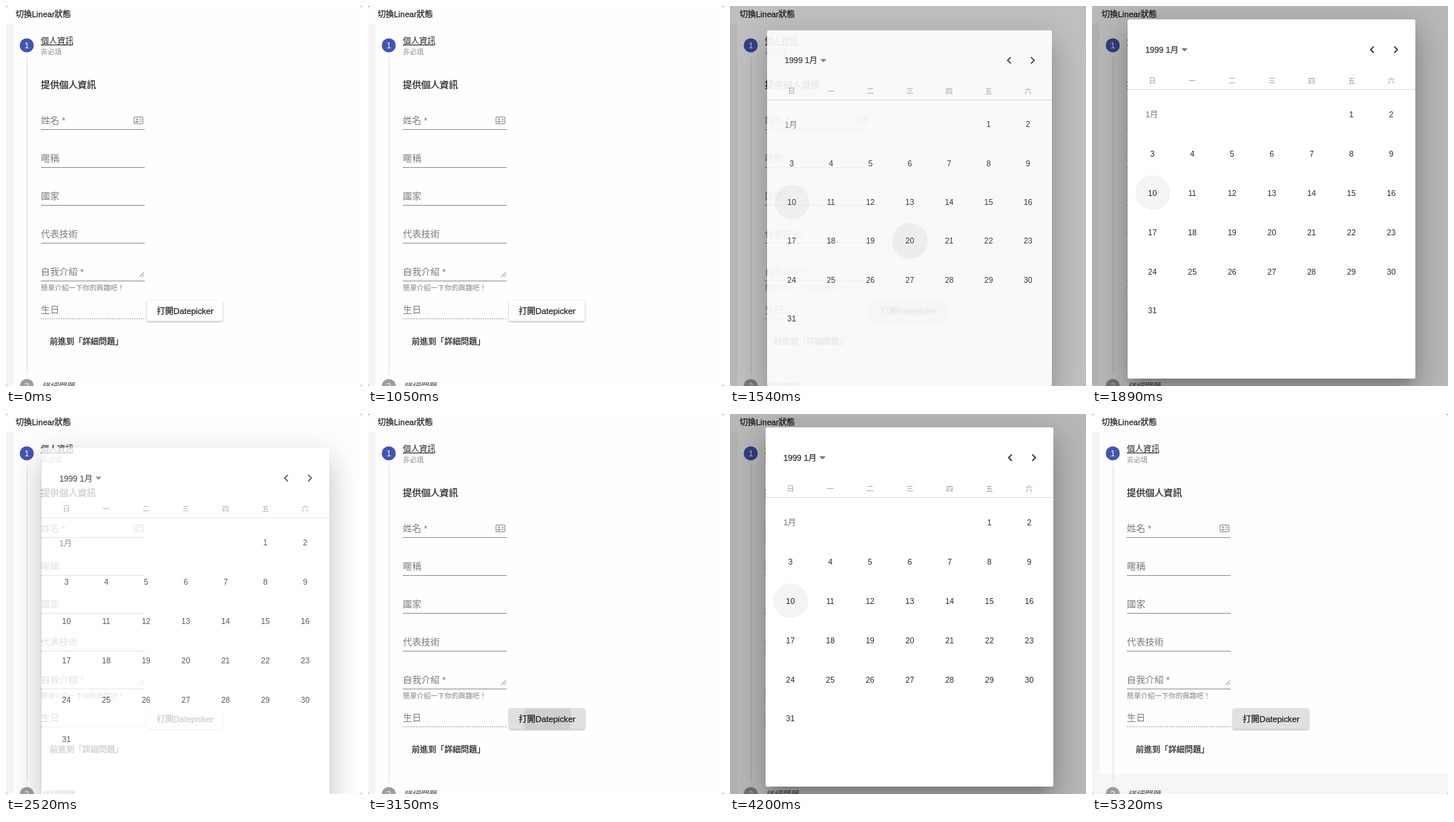
An HTML page for the animation above (5530 ms loop, 480 px wide and 512 px high).

```html
<!DOCTYPE html>
<html lang="zh-Hant">
<head>
<meta charset="utf-8">
<title>Stepper with datepicker dialog</title>
<style>
  html, body { margin: 0; width: 100%; height: 100%; overflow: hidden; background: #aaa; }
  #stage {
    position: relative; width: 480px; height: 512px; overflow: hidden;
    background: #fefefe; border-radius: 4px;
  }
  svg { position: absolute; left: 0; top: 0; display: block; }
  text {
    font-family: "Liberation Sans", "Noto Sans CJK TC", "Noto Sans CJK", sans-serif;
    white-space: pre;
  }
  .medium { font-weight: 500; stroke: currentColor; stroke-width: .25px; }
  #backdrop { position: absolute; inset: 0; background: #000; opacity: 0; }
  #dialog {
    position: absolute; left: 48px; top: 18px; width: 388px; height: 484px;
    background: #fff; border-radius: 2px; opacity: 0;
    box-shadow: 0 11px 15px -7px rgba(0,0,0,.2), 0 24px 38px 3px rgba(0,0,0,.14),
      0 9px 46px 8px rgba(0,0,0,.12);
  }
  #button { filter: drop-shadow(0 1px 1px rgba(0,0,0,.32)); }
</style>
</head>
<body>
<div id="stage">
  <svg id="form" width="480" height="512">
    <defs><clipPath id="buttonClip"><rect x="190" y="396.5" width="102.5" height="28" rx="2"/></clipPath></defs>
    <rect y="24" width="10" height="488" fill="#f5f5f5"/>
    <rect id="band" y="485" width="480" height="27" fill="#f6f6f6"/>
    <path d="M28.5 69V496" stroke="#dedede"/>
    <circle cx="28" cy="53" r="9.5" fill="#4355b3"/>
    <circle cx="28" cy="512" r="9.5" fill="#9e9e9e"/>
    <path d="M47 52.5H90" stroke="#222"/>
    <g fill="none" stroke="#a0a0a0" stroke-width="1.3">
      <rect x="172.6" y="149.6" width="12" height="9" rx="1"/>
      <path d="M180 152.7H183M180 155.3H183"/>
    </g>
    <g fill="#a0a0a0">
      <circle cx="176.6" cy="152.8" r="1.4"/>
      <path d="M174 157Q174 154.8 176.6 154.8T179.2 157Z"/>
    </g>
    <path d="M180 365L186 359M183.5 365L186 362.5" stroke="#777" stroke-width=".9"/>
    <path d="M47 421.5H187" stroke="#999" stroke-dasharray="1.5 1.5"/>
    <rect id="button" x="190" y="396.5" width="102.5" height="28" rx="2" fill="#fff"/>
    <g clip-path="url(#buttonClip)">
      <rect id="focus" x="190" y="396" width="103" height="29"/>
      <circle id="ripple" cx="242" cy="411"/>
    </g>
  </svg>
  <div id="backdrop"></div>
  <div id="dialog">
    <svg id="calendar" width="388" height="484">
      <circle id="active" cx="34" cy="233.5" r="23.5" fill-opacity=".045"/>
      <circle id="hover" cy="286.5" r="24.5" fill-opacity=".05"/>
      <path d="M0 94.5H388" stroke="#e0e0e0"/>
      <path d="M72.5 39H81L76.75 43.3Z" fill="#757575"/>
      <path d="M332 36.5L327.7 40.8L332 45.1M359.5 36.5L363.8 40.8L359.5 45.1"
        fill="none" stroke="#333" stroke-width="1.7"/>
    </svg>
  </div>
</div>
<script>
const LOOP = 5530, STEP = 70, FADE = 400;
// click: ripple start, open/close: dialog start, focus: time the button regains focus
const visits = [
  { click: 1050, open: 1370, close: 2492, focus: [2870, 2940], hover: 194.6 },
  { click: 3080, open: 3492, close: 4452, focus: [4800, 5040], hover: 248.3 }
];
const $ = id => document.getElementById(id);
const clamp = v => Math.min(1, Math.max(0, v));
const ramp = (t, a, b) => clamp((t - a) / (b - a));

function add(parent, tag, attrs) {
  const el = document.createElementNS('http://www.w3.org/2000/svg', tag);
  for (const k in attrs) el.setAttribute(k, attrs[k]);
  parent.append(el);
  return el;
}

// y is the vertical middle of the glyphs
function label(parent, str, x, y, size, color, extra = {}) {
  const el = add(parent, 'text', { x, y: y + size * .37, 'font-size': size, fill: color, color, ...extra });
  el.textContent = str;
}

const medium = { class: 'medium' };
const mid = { 'text-anchor': 'middle' };

function buildForm() {
  const f = $('form');
  label(f, '切換Linear狀態', 13, 11, 11, '#222', medium);
  label(f, '1', 28, 53, 11, '#fff', mid);
  label(f, '2', 28, 512, 11, '#fff', mid);
  label(f, '個人資訊', 47, 47, 11, '#222');
  label(f, '非必填', 47, 61.5, 9.4, '#8c8c8c');
  label(f, '提供個人資訊', 47, 106, 12.4, '#222', medium);
  ['姓名 *', '暱稱', '國家', '代表技術', '自我介紹 *', '生日'].forEach((name, i) => {
    const y = 154.3 + 51 * i;
    label(f, name, 47, y, 12.4, '#7a7a7a');
    if (i < 5) add(f, 'path', { d: `M47 ${Math.floor(y + 12) + .5}H187`, stroke: '#949494' });
  });
  label(f, '簡單介紹一下你的興趣吧！', 47, 380, 9.4, '#808080');
  label(f, '打開Datepicker', 241.5, 410.5, 11.3, '#222', { ...medium, ...mid });
  label(f, '前進到「詳細問題」', 59, 451.5, 11, '#222', medium);
  label(f, '詳細問題', 48, 511.5, 11, '#444', { 'font-style': 'italic' });
}

function buildCalendar() {
  const c = $('calendar');
  const colX = i => 33.5 + 53.65 * i;
  label(c, '1999 1月', 24, 41, 11, '#333', medium);
  [...'日一二三四五六'].forEach((d, i) => label(c, d, colX(i), 82, 9.6, '#9b9b9b', mid));
  label(c, '1月', 24, 128, 11, '#777');
  for (let day = 1; day <= 31; day++) {
    const cell = day + 4;
    label(c, day, colX(cell % 7), 128 + 52.9 * Math.floor(cell / 7), 10.6, '#2a2a2a', mid);
  }
}

// cubic-bezier(.25, .8, .25, 1)
function ease(x) {
  if (x <= 0) return 0;
  if (x >= 1) return 1;
  let lo = 0, hi = 1;
  for (let i = 0; i < 24; i++) {
    const s = (lo + hi) / 2;
    if (.75 * s * (1 - s) + s ** 3 < x) lo = s; else hi = s;
  }
  const s = lo, r = 1 - s;
  return 2.4 * r * r * s + 3 * r * s * s + s ** 3;
}

function draw(t) {
  const v = t < 2975 ? visits[0] : visits[1];
  const enter = ease((t - v.open) / FADE);
  const leave = ease((t - v.close) / FADE);
  const closing = t >= v.close;
  const rest = 1 - enter;

  $('dialog').style.opacity = closing ? 1 - leave : enter;
  $('dialog').style.transform = closing
    ? `translateY(${25 * leave}%)`
    : `translateY(${25 * rest}%) scale(${1 - .1 * rest})`;
  $('backdrop').style.opacity = closing ? 0 : .28 * enter;

  $('active').style.opacity = closing ? 0 : 1;
  $('hover').setAttribute('cx', v.hover);
  $('hover').style.opacity = t < v.open + FADE ? 1 : 0;

  const pressed = v === visits[0] ? ramp(t, v.click, v.click + 250) : 1;
  const focus = t < v.open + FADE ? pressed : ramp(t, ...v.focus);
  $('focus').style.opacity = .12 * focus;

  const grow = ramp(t, v.click, v.open);
  $('ripple').setAttribute('r', 62 * ease(grow));
  $('ripple').style.opacity = .08 * (1 - ramp(t, v.click + 160, v.open + 40));

  $('band').style.opacity = t >= 4690 ? 1 : 0;
}

buildForm();
buildCalendar();
const start = performance.now();
function tick() {
  const t = (performance.now() - start) % LOOP;
  draw(Math.floor(t / STEP) * STEP);
  requestAnimationFrame(tick);
}
tick();
</script>
</body>
</html>
```
